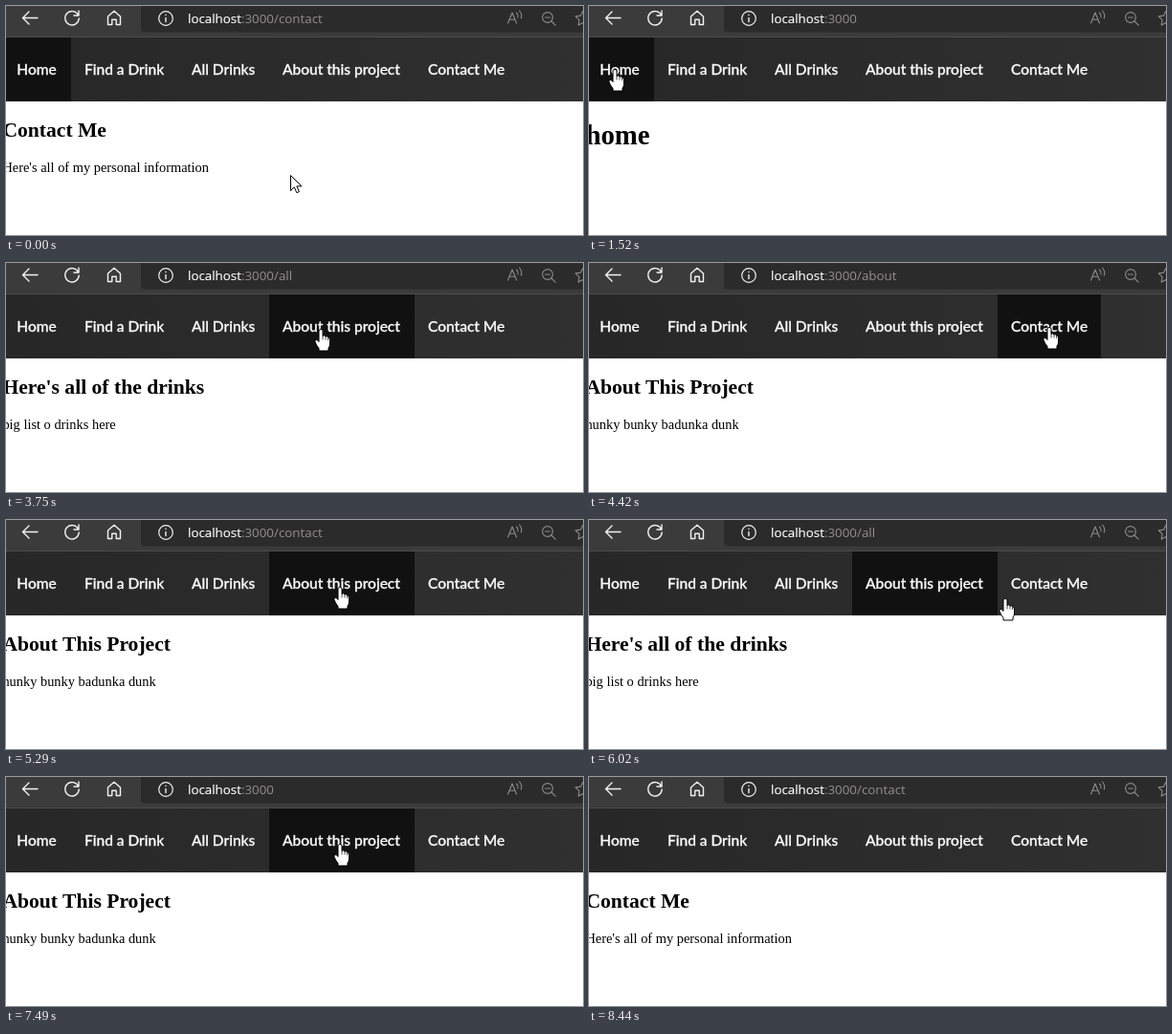
An HTML page for the animation above (8920 ms loop, 603 px wide and 240 px high).

```html
<!DOCTYPE html>
<html lang="en">
<head>
<meta charset="utf-8">
<title>Drinks navigation</title>
<style>
html, body { margin: 0; width: 100%; height: 100%; overflow: hidden; background: #fff; }
svg { display: block; width: 603px; height: 240px; }
.icon { fill: none; stroke: #f2f2f2; stroke-width: 1.4; stroke-linecap: round; stroke-linejoin: round; }
.dim { stroke: #8c8c8c; stroke-width: 1.1; }
.url { font: 13.35px "Open Sans", "Noto Sans", sans-serif; fill: #928e91; }
.url .host { fill: #fff; stroke: #fff; stroke-width: .15; }
.nav { font: 500 15.5px Lato, sans-serif; fill: #fff; stroke: #fff; stroke-width: .3; }
.page { font-family: "Liberation Serif", "Times New Roman", serif; fill: #000; }
.h1 { font-size: 28.8px; font-weight: bold; }
.h2 { font-size: 21.6px; font-weight: bold; }
.p { font-size: 14.4px; }
.cursor { fill: #fff; stroke: #000; stroke-width: 1; stroke-linejoin: round; }
</style>
</head>
<body>
<svg viewBox="0 0 603 240">
  <defs>
    <linearGradient id="bar">
      <stop offset="0" stop-color="#272727"/>
      <stop offset="1" stop-color="#303030"/>
    </linearGradient>
  </defs>
  <rect width="603" height="240" fill="#fff"/>

  <rect width="603" height="33" fill="#3b3b3b"/>
  <rect x="141" y="-10" width="480" height="37.5" rx="4" fill="#2b2b2b"/>
  <rect y="32" width="603" height="1" fill="#4b4b4b"/>
  <g class="icon">
    <path d="M33 12.5H18M24 6l-6.5 6.5L24 19"/>
    <path d="M75.6 9.8A7.2 7.2 0 1 0 76.2 13M76 5v5h-5"/>
    <path d="M106.5 11l6.5-5.7 6.5 5.7v8.5h-4.3v-5.2h-4.4v5.2h-4.3z"/>
    <circle cx="167" cy="13" r="7.3" stroke-width="1.2"/>
    <path d="M167 12.5v4M167 9.3v.2"/>
  </g>
  <g class="icon dim">
    <path d="M524.5 18l4.5-11 4.5 11M526 14.2h6M533.5 7q2 2 1.4 5M536.5 5q3.2 3.5 1.8 8"/>
    <circle cx="566" cy="12" r="5.4"/>
    <path d="M570 16l4.2 4.2M563.5 12h5"/>
    <path d="M603 5.2l-2.4 4.9-5.4.8 3.9 3.8-.9 5.4 4.8-2.5"/>
  </g>
  <text class="url" x="190" y="18"><tspan class="host">localhost</tspan><tspan id="path"></tspan></text>

  <rect y="33" width="603" height="67" fill="url(#bar)"/>
  <rect id="hover" y="33" height="67" fill="#111"/>
  <g id="nav" class="nav"></g>

  <g class="page">
    <text id="title" x="-3.6"></text>
    <text id="body" class="p" x="-3.6" y="174"></text>
  </g>

  <g id="cursor" class="cursor">
    <path id="arrow" d="M.5 .5V16.5l3.8-3.6 2.5 5.8 2.6-1.1-2.5-5.7h5z"/>
    <g id="hand" transform="translate(-1 0)">
      <path d="M-2 1.5Q0-1 2 1.5V7.5Q4 6 5 8Q7 7 7.6 9Q9.5 8.5 9.5 11V16Q9.5 18.5 8 20V23H-2V20.5Q-5 17-6 13.5Q-6.5 10.5-4 11.5L-2 13.5Z"/>
      <path d="M2 7.5v4M5 8v3.5M7.6 9v3" stroke-width=".7"/>
    </g>
  </g>
</svg>
<script>
const LOOP = 8920, STEP = 66.8, CURSOR_GONE = 8440;
const URL_DELAY = 130, HOVER_DELAY = 30;
const NAV_BOTTOM = 100, NAV_END = 535, PADDING = 14;

const link = (x, label, path, title, body = "") => ({ x, label, path, title, body });
const home = link(11.3, "Home", "", "home");
const find = link(82, "Find a Drink", "/find", "Find a Drink Here", "quiz? questionairre?");
const all = link(194, "All Drinks", "/all", "Here's all of the drinks", "big list o drinks here");
const about = link(289, "About this project", "/about", "About This Project", "hunky bunky badunka dunk");
const contact = link(441, "Contact Me", "/contact", "Contact Me", "Here's all of my personal information");
const links = [home, find, all, about, contact];

const move = (start, end, x, y) => ({ start, end, x, y });
const moves = [
  move(0, 0, 297, 177),
  move(70, 930, 32, 88),
  move(930, 990, 28, 66),
  move(1930, 2070, 172, 72),
  move(3070, 3140, 215, 68),
  move(3540, 3800, 348, 69),
  move(4230, 4420, 483, 67),
  move(4950, 5140, 350, 70),
  move(5360, 5500, 226, 70),
  move(5690, 6160, 500, 86),
  move(6160, 6520, 57, 67),
  move(6900, 7300, 350, 70),
  move(7560, 7700, 476, 70),
  move(8000, 8370, 538, 196)
];

const click = (start, page) => ({ start, page });
const clicks = [
  click(-LOOP, contact), click(1390, home), click(2680, find), click(3340, all),
  click(3960, about), click(4760, contact), click(5230, about), click(5560, all),
  click(6720, home), click(7420, about), click(7770, contact)
];

const $ = id => document.getElementById(id);
const pageAt = t => clicks.findLast(c => c.start <= t).page;
const smooth = u => u * u * (3 - 2 * u);
const show = (el, visible) => { el.style.display = visible ? "" : "none"; };

function cursorAt(t) {
  const i = Math.max(0, moves.findLastIndex(m => m.start <= t));
  const to = moves[i], from = moves[i - 1] || to;
  const f = t < to.end ? smooth((t - to.start) / (to.end - to.start)) : 1;
  return { x: from.x + (to.x - from.x) * f, y: from.y + (to.y - from.y) * f };
}

function linkUnder({ x, y }) {
  if (y > NAV_BOTTOM || x >= NAV_END) return -1;
  return Math.max(0, links.findLastIndex(l => l.x - PADDING <= x));
}

function drawPage(t) {
  const page = pageAt(t), isHome = page === home;
  $("title").textContent = page.title;
  $("title").setAttribute("class", isHome ? "h1" : "h2");
  $("title").setAttribute("y", isHome ? 145 : 137);
  $("body").textContent = page.body;
  $("path").textContent = ":3000" + pageAt(t - URL_DELAY).path;
}

function drawHover(index) {
  show($("hover"), index >= 0);
  if (index < 0) return;
  const left = Math.max(0, links[index].x - PADDING);
  const right = index + 1 < links.length ? links[index + 1].x - PADDING : NAV_END;
  $("hover").setAttribute("x", left);
  $("hover").setAttribute("width", right - left);
}

function drawCursor(t, { x, y }) {
  $("cursor").setAttribute("transform", `translate(${Math.round(x)} ${Math.round(y)})`);
  show($("cursor"), t < CURSOR_GONE);
  show($("hand"), y <= NAV_BOTTOM);
  show($("arrow"), y > NAV_BOTTOM);
}

function draw(t) {
  const stepped = Math.floor(t / STEP) * STEP;
  drawPage(t);
  drawHover(linkUnder(cursorAt(stepped - HOVER_DELAY)));
  drawCursor(t, cursorAt(stepped));
}

for (const { x, label } of links) {
  const text = document.createElementNS($("nav").namespaceURI, "text");
  text.setAttribute("x", x);
  text.setAttribute("y", 72);
  text.textContent = label;
  $("nav").append(text);
}

const begin = performance.now();
function tick() {
  draw((performance.now() - begin) % LOOP);
  requestAnimationFrame(tick);
}
tick();
</script>
</body>
</html>
```
